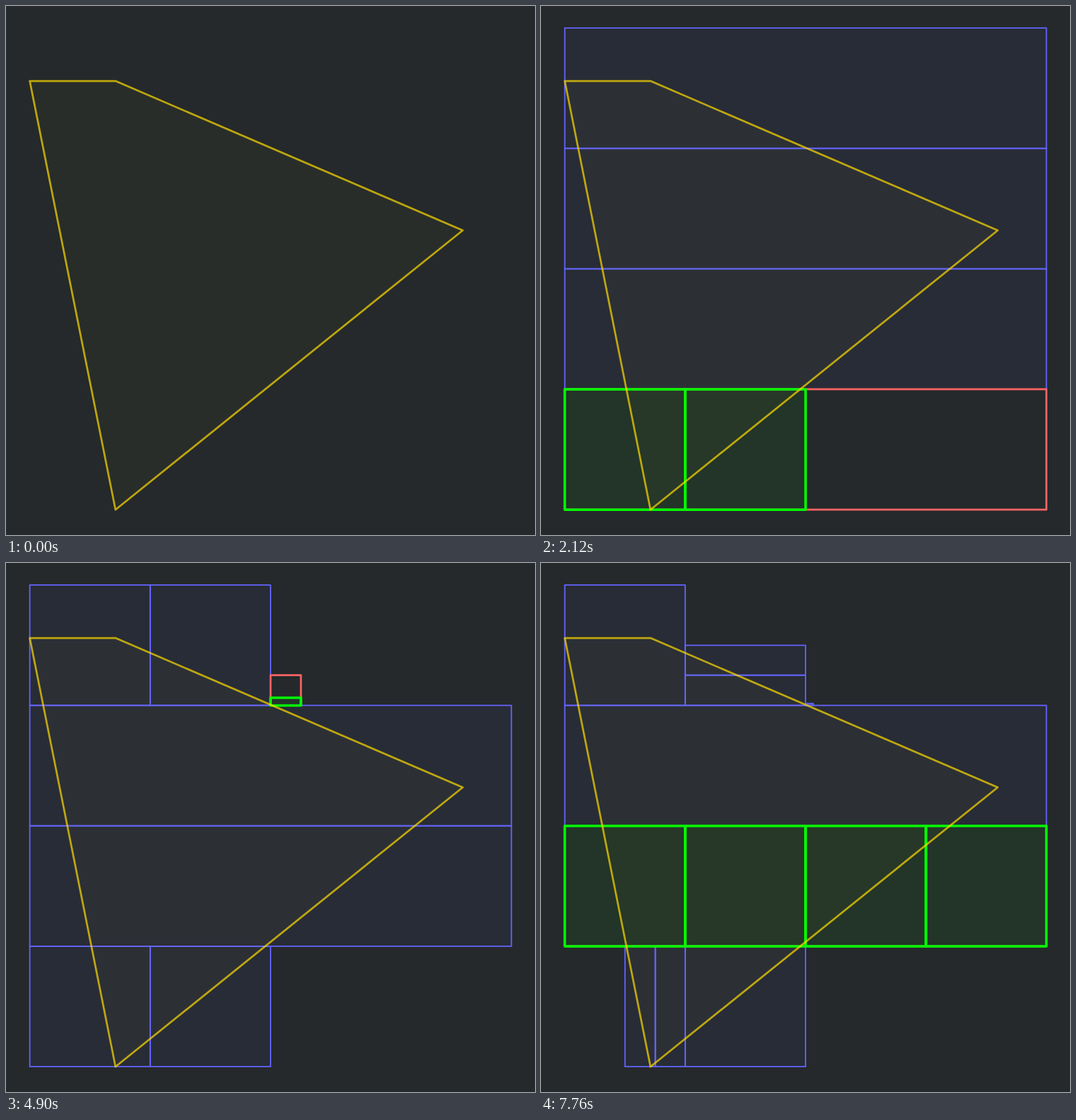
Animation, 748 px wide and 748 px high, one loop 8 s. Source, as an HTML page:

```html
<!DOCTYPE html>
<html lang="en">
<head>
<meta charset="utf-8">
<title>Polygon subdivision</title>
<style>
  html, body { margin: 0; width: 100%; height: 100%; overflow: hidden; background: #25292b; }
  svg { display: block; width: 100vw; height: 100vh; }
  path { stroke-linejoin: round; }
  .kept { fill: rgba(100, 100, 255, .05); stroke: #6464ff; stroke-width: 1.8; }
  .parent { fill: none; stroke: #ff6464; stroke-width: 2.7; }
  .child { fill: rgba(0, 255, 0, .05); stroke: #0f0; stroke-width: 3.6; }
  .polygon { fill: rgba(255, 220, 0, .02); stroke: rgba(255, 220, 0, .7); stroke-width: 2.7; }
</style>
</head>
<body>
<svg viewBox="0 0 748 748">
  <g id="cells"></g>
  <path id="polygon" class="polygon"/>
</svg>
<script>
const LOOP = 8000;
const SCALE = 0.681, LEFT = 33.6, BOTTOM = 712.2;

// World units run from 0 to 1000 with y pointing up.
const toPath = points => 'M' + points
  .map(([x, y]) => `${LEFT + x * SCALE},${BOTTOM - y * SCALE}`).join('L') + 'Z';

// Cells are [left, bottom, right, top].
const cellPath = (type, [l, b, r, t]) =>
  `<path class="${type}" d="${toPath([[l, b], [r, b], [r, t], [l, t]])}"/>`;

const split = (size, n) => Array.from({ length: n }, (_, i) => [i * size, (i + 1) * size]);
const row = (b, n) => split(250, n).map(([l, r]) => [l, b, r, b + 250]);

const root = [0, 0, 1000, 1000];
const strips = split(250, 4).map(([b, t]) => [0, b, 1000, t]);
const bottomRow = row(0, 2);
const topRow = row(750, 3);
const ledge = [500, 750, 750, 813];
const block = [500, 750, 563, 813];
const sliver = [500, 750, 563, 766];
const speck = [500, 750, 516, 766];

// [time, cell being split, children that touch the polygon]
const steps = [
  [0, null, []],
  [500, null, [root]],
  [1290, root, strips],
  [2120, strips[0], bottomRow],
  [2820, null, []],
  [2850, strips[3], topRow],
  [3550, topRow[2], [ledge]],
  [4210, ledge, [block]],
  [4900, block, [sliver]],
  [5470, sliver, [speck]],
  [6080, speck, [[500, 750, 516, 754]]],
  [6690, topRow[1], [[250, 750, 500, 813], [250, 813, 500, 875]]],
  [7190, null, []],
  [7260, bottomRow[0], [[125, 0, 188, 250], [188, 0, 250, 250]]],
  [7760, strips[1], row(250, 4)]
];

let kept = [], previous = [];
const scenes = steps.map(([, parent, children]) => {
  kept = [...kept, ...previous].filter(cell => String(cell) !== String(parent));
  previous = children;
  return kept.map(c => cellPath('kept', c)).join('')
    + (parent ? cellPath('parent', parent) : '')
    + children.map(c => cellPath('child', c)).join('');
});

document.getElementById('polygon')
  .setAttribute('d', toPath([[0, 890], [178, 890], [899, 580], [178, 0]]));

const cells = document.getElementById('cells');
const start = performance.now();
let shown = -1;

function draw() {
  const time = (performance.now() - start) % LOOP;
  const index = steps.filter(([at]) => at <= time).length - 1;
  if (index !== shown) cells.innerHTML = scenes[shown = index];
  requestAnimationFrame(draw);
}
draw();
</script>
</body>
</html>
```
